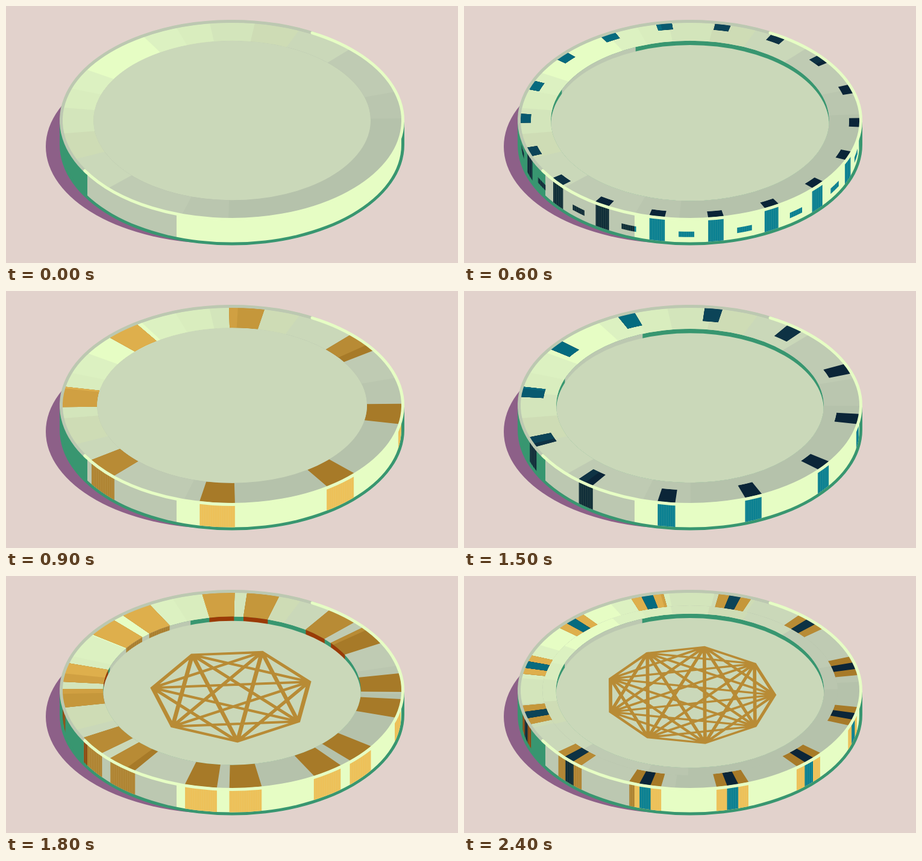
An HTML page with a canvas for the animation above (2700 ms loop, 750 px wide and 428 px high).

```html
<!DOCTYPE html>
<html lang="en">
<head>
<meta charset="utf-8">
<title>Chips</title>
<style>
html, body { margin: 0; width: 100%; height: 100%; overflow: hidden; background: #e2d2cc; }
canvas { display: block; }
</style>
</head>
<body>
<canvas id="stage" width="750" height="428"></canvas>
<script>
const g = document.getElementById('stage').getContext('2d');
const CX = 375, TOP = 190.5, BASE = 231, R = 281, TILT = 0.5774;
const SINK = TOP + 0.6, FLOOR = SINK + 7.3;
const STEP = 300;
const BG = '#e2d2cc', SHADOW = '#8d6088', GREEN = '#389670', GREY = '#bcc8b1', LIME = '#e6fdc4', PLATE = '#cad8b9', MESH = '#b88b35';
const rad = a => a * Math.PI / 180;

// Facet colours, by angular distance from the light at 225 degrees
const LIGHT = 225;
const FACETS = ['#e6fdc4', '#dcf1c1', '#d9edbe', '#d3e5bb', '#cedcb5', '#cad8b9', '#bfcbb3', '#bac6af', '#b5c2ab'];
const FLAT = [13.75, 26, 37.5, 52.7, 68.2, 88.6, 118, 133.8];
const STEEP = [9.4, 24, 37, 52, 69, 90, 121.4, 138.6];
const INK_EDGES = [35, 47, 68, 97];
const INK = {
  gold: { ring: ['#deaf4c', '#d0a042', '#c5973b', '#b88b35', '#a77a28'], wall: ['#8a4a12', '#ae8230', '#edc057'], inner: ['#9a3a06', '#a97c2c'] },
  teal: { ring: ['#056b7f', '#085a70', '#0c4458', '#0e3244', '#0b2538'], wall: ['#0c2a38', '#0b2a36', '#067e91'], inner: ['#0c2a38', '#0c2a38'] }
};
const ZONES = [[80, 135, GREEN], [135, 283, GREY], [283, 670, LIME]];

// Repeats a mark of [from, to] degrees around the chip
function marks(ink, base, period, spans, opt) {
  return { ink, base, period, spans, low: TOP, high: BASE + 2, ...opt };
}
const BAND = { ring: 0, low: 213.5, high: 222.5 };
const chips = [
  { hole: 230, k: 0 },
  { hole: 216, k: 0.6, sunk: true, marks: [marks('gold', 15, 60, [[-10, 10]], { ring: 216 })] },
  { hole: 231, k: -0.5, sunk: true, marks: [
    marks('teal', 1.2, 20, [[-2.65, 2.65]], { ring: 264 }),
    marks('teal', 11.2, 20, [[-2.65, 2.65]], BAND)] },
  { hole: 224, k: 0.2, marks: [marks('gold', 5, 45, [[-6, 6]], { ring: 224 })] },
  { hole: 207, k: 1, sunk: true, marks: [marks('teal', 36, 60, [[-15, 15]], BAND)] },
  { hole: 222, k: 0.3, sunk: true, marks: [marks('teal', 8, 30, [[-3, 3]], { ring: 244 })] },
  { hole: 214, k: 0.7, sunk: true, marks: [marks('gold', 3, 45, [[-13.1, -2.1], [2.1, 13.1]], { ring: 214 })],
    mesh: [7, 133.5, -16.7, 7] },
  { marks: [
    marks('gold', 9.4, 60, [[-20.5, -5.5], [5.5, 20.5]], { ring: 0 }),
    marks('teal', 9.4, 60, [[-2.1, 2.1]], { ring: 0 })],
    mesh: [8, 179.8, 18.7, 9] },
  { hole: 222.5, k: 0.1, sunk: true, outer: [245, -0.8], marks: [
    marks('gold', 15.4, 30, [[-5.6, 5.6]], { ring: 244 }),
    marks('teal', 15.4, 30, [[-1.95, 1.95]], { ring: 244 })],
    mesh: [9, 140.3, -0.25, 5.8] }
];

function clipped(path, draw) {
  g.save();
  g.clip(path);
  draw();
  g.restore();
}
function disc(r, y) {
  const p = new Path2D();
  p.ellipse(CX, y, r, r * TILT, 0, 0, 7);
  return p;
}
// Flat piece of ring between two radii
function sector(a0, a1, r0, r1) {
  const p = new Path2D();
  p.ellipse(CX, TOP, r1, r1 * TILT, 0, rad(a0), rad(a1));
  p.ellipse(CX, TOP, r0, r0 * TILT, 0, rad(a1), rad(a0), true);
  p.closePath();
  return p;
}
// Upright piece of a cylinder between two heights
function upright(a0, a1, r, y0, y1) {
  const p = new Path2D();
  p.ellipse(CX, y0, r, r * TILT, 0, rad(a0), rad(a1));
  p.ellipse(CX, y1, r, r * TILT, 0, rad(a1), rad(a0), true);
  p.closePath();
  return p;
}
function fill(path, color) {
  g.fillStyle = color;
  g.fill(path);
}
// Joins the pieces of a mark that fall between two angles
function markPath(m, min, max, piece) {
  const p = new Path2D();
  for (let turn = m.base - 360; turn < m.base + 360; turn += m.period)
    for (const [from, to] of m.spans) {
      const a = Math.max(turn + from, min), b = Math.min(turn + to, max);
      if (b > a) p.addPath(piece(a, b));
    }
  return p;
}

function shade(colors, edges, r0, r1) {
  fill(sector(0, 360, r0, r1), colors[edges.length]);
  for (let i = edges.length - 1; i >= 0; i--)
    fill(sector(LIGHT - edges[i], LIGHT + edges[i], r0, r1), colors[i]);
}
function bevel(r0, r1, k) {
  shade(FACETS, FLAT.map((d, i) => d + (STEEP[i] - d) * k), r0, r1);
}
function striped(path, color) {
  fill(path, color);
  clipped(path, () => {
    g.fillStyle = 'rgba(225,225,175,.15)';
    for (let x = 90; x < 660; x += 3) g.fillRect(x, 0, 1, 428);
  });
}

function body(chip) {
  g.fillStyle = BG;
  g.fillRect(0, 0, 750, 428);
  const shadow = new Path2D();
  shadow.ellipse(352, 234, 286, 161.5, 0, 0, 7);
  fill(shadow, SHADOW);

  const hull = new Path2D();
  hull.ellipse(CX, BASE, 286, 167.5, 0, 0, Math.PI);
  hull.lineTo(89, TOP);
  hull.lineTo(661, TOP);
  fill(hull, GREEN);

  const wall = new Path2D();
  wall.ellipse(CX, BASE, R, 162.5, 0, 0, Math.PI);
  wall.lineTo(CX - R, TOP);
  wall.lineTo(CX + R, TOP);
  wall.closePath();
  clipped(wall, () => ZONES.forEach(([x0, x1, color], i) => {
    const box = new Path2D();
    box.rect(x0, 0, x1 - x0, 428);
    clipped(box, () => {
      fill(box, color);
      for (const m of chip.marks || [])
        striped(markPath(m, 0, 180, (a, b) => upright(a, b, R, m.low, m.high)), INK[m.ink].wall[i]);
    });
  }));
}

function innerWall(chip) {
  const r = chip.hole, lit = 28 + (207 - r) * 0.25;
  const deep = (a, b) => upright(a, b, r, SINK - 1, FLOOR + 1);
  const cut = (chip.marks || []).filter(m => m.ring === r);
  clipped(disc(r, SINK), () => {
    fill(disc(r, SINK), GREEN);
    for (const m of cut) fill(markPath(m, 160, 380, deep), INK[m.ink].inner[0]);
    const grey = deep(LIGHT - lit, LIGHT + lit);
    fill(grey, GREY);
    clipped(grey, () => {
      for (const m of cut) striped(markPath(m, 160, 380, deep), INK[m.ink].inner[1]);
    });
    fill(disc(r, FLOOR), PLATE);
  });
}

function face(chip) {
  fill(disc(R + 1, TOP), PLATE);
  if (chip.hole) {
    // a sunk floor sits a little lower, so the ring reaches under its edge
    const lap = chip.sunk ? 1.5 : 0;
    bevel(chip.hole - lap, R + 1, chip.k);
    if (chip.outer) bevel(chip.outer[0], R + 1, chip.outer[1]);
    for (const m of chip.marks || []) {
      if (!m.ring) continue;
      const r0 = m.ring === chip.hole ? m.ring - lap : m.ring;
      const path = markPath(m, -360, 720, (a, b) => sector(a, b, r0, R + 1));
      clipped(path, () => shade(INK[m.ink].ring, INK_EDGES, r0, R + 1));
    }
    if (chip.sunk) innerWall(chip);
  }
  if (chip.mesh) mesh(chip.sunk ? FLOOR : TOP + 0.5, ...chip.mesh);
}

function mesh(y, n, r, turn, width) {
  const at = i => [r * Math.cos(rad(turn + i * 360 / n)), r * Math.sin(rad(turn + i * 360 / n))];
  g.save();
  g.translate(CX, y);
  g.scale(1, TILT);
  g.strokeStyle = MESH;
  g.lineWidth = width;
  g.beginPath();
  for (let i = 0; i < n; i++) g.lineTo(...at(i));
  g.closePath();
  for (let i = 0; i < n; i++)
    for (let j = i + 2; j < n; j++) {
      g.moveTo(...at(i));
      g.lineTo(...at(j));
    }
  g.stroke();
  g.restore();
}

function rim() {
  g.lineWidth = 5;
  for (const [from, to, color, cap] of [[148, 300, GREY, 'butt'], [-62, 149.5, LIME, 'round']]) {
    g.strokeStyle = color;
    g.lineCap = cap;
    g.beginPath();
    g.ellipse(CX, TOP, 283.5, 165, 0, rad(from), rad(to));
    g.stroke();
  }
  g.lineCap = 'butt';
}

const start = performance.now();
let shown = -1;
function loop() {
  const i = Math.floor((performance.now() - start) / STEP) % chips.length;
  if (i !== shown) {
    shown = i;
    body(chips[i]);
    face(chips[i]);
    rim();
  }
  requestAnimationFrame(loop);
}
loop();
</script>
</body>
</html>
```
